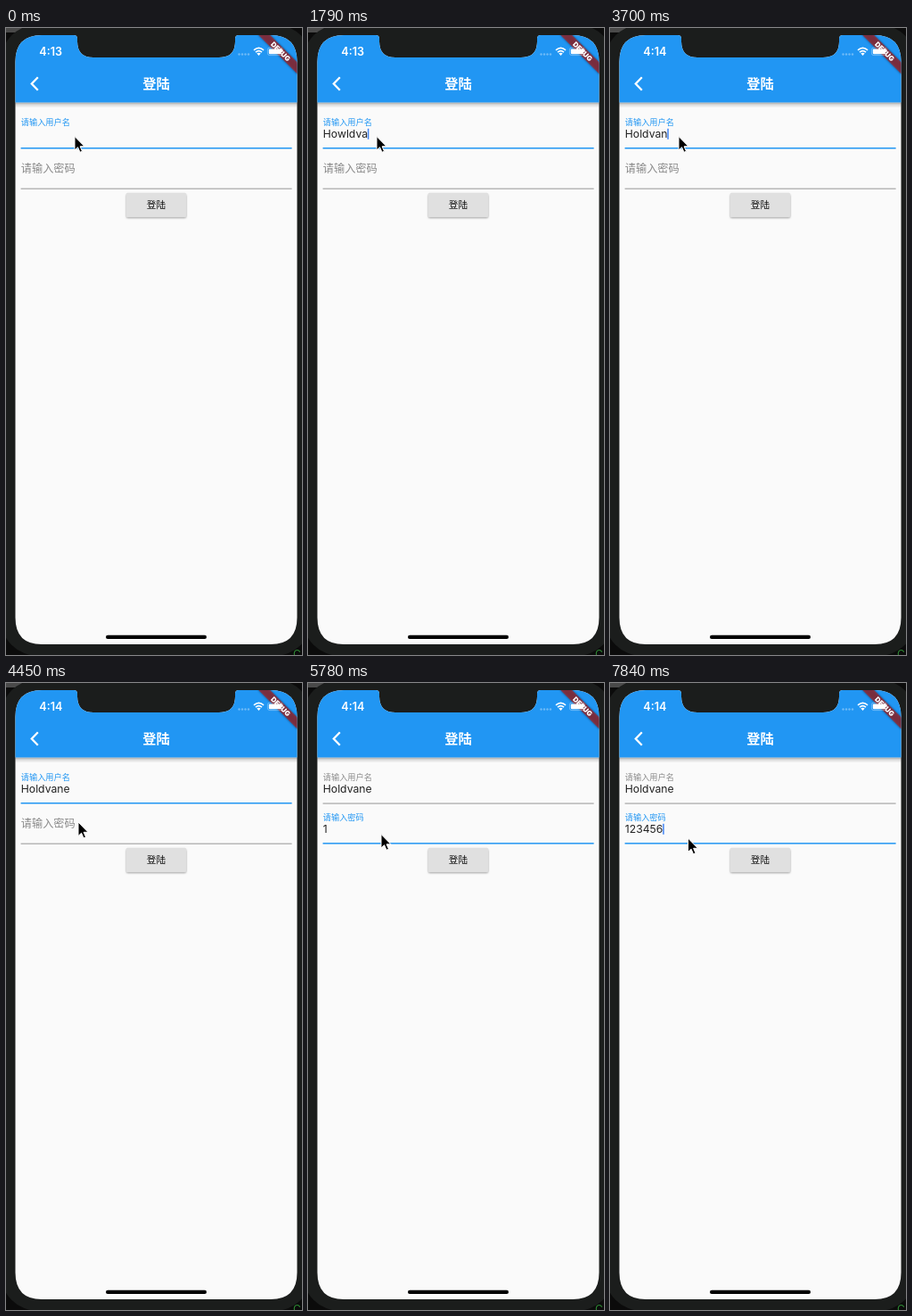
An HTML page for the animation above (7.99 s loop, 332 px wide and 703 px high).

```html
<!DOCTYPE html>
<html lang="zh-CN">
<head>
<meta charset="utf-8">
<title>登陆</title>
<style>
html, body { margin: 0; width: 100%; height: 100%; overflow: hidden; background: #0b0b0b; }
svg { display: block; width: 332px; height: 703px; }
text { font-family: Inter, "Noto Sans CJK SC", "Noto Sans CJK", sans-serif; }
.mid { text-anchor: middle; }
.entry { font-size: 12.2px; fill: #222; }
</style>
</head>
<body>
<svg viewBox="0 0 332 703">
  <defs>
    <clipPath id="screen">
      <path d="M40 8H76Q80 8 80 12V15Q80 33 98 33H239Q257 33 257 15V12Q257 8 261 8H297Q326.5 8 326.5 38V661Q326.5 691 297 691H40Q10.500 691 10.500 661V38Q10.500 8 40 8Z"/>
    </clipPath>
    <linearGradient id="shade" x2="0" y2="1">
      <stop offset="0" stop-opacity=".34"/>
      <stop offset=".4" stop-opacity=".13"/>
      <stop offset="1" stop-opacity="0"/>
    </linearGradient>
    <filter id="soft" x="-20%" y="-50%" width="140%" height="200%"><feGaussianBlur stdDeviation="1"/></filter>
  </defs>

  <rect width="332" height="703" fill="#0b0b0b"/>
  <rect width="30" height="5" fill="#4a4a4a"/>
  <rect x="-6" y="-4" width="349" height="708" rx="42" fill="#1b1d1c"/>
  <text x="322" y="706" font-size="12" fill="#2f8a35">C</text>

  <g clip-path="url(#screen)">
    <rect x="10" y="8" width="317" height="683" fill="#fafafa"/>
    <rect x="10" y="83.500" width="317" height="6" fill="url(#shade)"/>
    <rect x="10" y="8" width="317" height="75.500" fill="#2196f3"/>
    <g transform="translate(326.500 8) rotate(45)">
      <rect x="-31" y="21.400" width="62" height="9.200" fill="#000" opacity=".5" filter="url(#soft)"/>
      <rect x="-31" y="21.400" width="62" height="9.200" fill="#b71c1c" opacity=".63"/>
      <text class="mid" y="28.800" font-size="7.800" font-weight="900" fill="#fff">DEBUG</text>
    </g>
    <g fill="#fff">
      <text id="clock" x="37.300" y="31" font-size="12.600" font-weight="600"></text>
      <g opacity=".35">
        <circle cx="261.500" cy="29.500" r="1.200"/><circle cx="265" cy="29.500" r="1.200"/>
        <circle cx="268.500" cy="29.500" r="1.200"/><circle cx="272" cy="29.500" r="1.200"/>
      </g>
      <path d="M283.500 31L281.300 28.600Q283.500 26.900 285.700 28.600Z"/>
      <path d="M278 24.900Q283.500 19.900 289 24.900M280 27.200Q283.500 24 287 27.200" fill="none" stroke="#fff" stroke-width="1.700"/>
      <rect x="293.400" y="22" width="17" height="8.600" rx="2.400" fill="none" stroke="#fff" stroke-width=".8" opacity=".4"/>
      <rect x="294.800" y="23.400" width="14.200" height="5.900" rx="1.200"/>
      <text class="mid" x="168.500" y="68" font-size="15.200" font-weight="700">登陆</text>
    </g>
    <path d="M35.800 55.300L28.800 62.500L35.800 69.700" fill="none" stroke="#fff" stroke-width="2.300"/>

    <text id="userLabel" x="16.800" y="108.800" font-size="9.200">请输入用户名</text>
    <text id="user" class="entry" x="16.800" y="122.800"></text>
    <rect id="userLine" x="16.600" width="304"/>
    <text id="passLabel" x="16.800">请输入密码</text>
    <text id="pass" class="entry" x="16.800" y="167.800"></text>
    <rect id="passLine" x="16.600" width="304"/>
    <rect id="caret" width="1.500" height="12" fill="#4285f4"/>

    <rect x="135" y="186.500" width="67" height="26.500" rx="1.500" opacity=".4" filter="url(#soft)"/>
    <rect x="134.800" y="184.800" width="67.300" height="27.400" rx="1.500" fill="#e0e0e0"/>
    <text class="mid" x="168.500" y="202.200" font-size="10.700" font-weight="500" fill="#111">登陆</text>
    <circle id="touch" cx="83.500" cy="169.500" r="15" opacity=".09"/>
    <rect x="112" y="680.800" width="113" height="4.200" rx="2.100"/>
  </g>
  <path id="mouse" d="M0 0V15.500L3.600 12.200L6 17.800L8.500 16.700L6.100 11.300H11Z" stroke="#fff" stroke-width="1" stroke-linejoin="round"/>
</svg>
<script>
const LOOP = 7990;
const BLUE = [33, 150, 243], GRAY = [138, 138, 138];
const el = Object.fromEntries([...document.querySelectorAll('svg [id]')].map(e => [e.id, e]));

// Each track holds [start ms, value...]; values change hard.
const tracks = {
  clock: [[0, '4:13'], [2080, '4:14']],
  user: [
    [0, ''], [900, 'H'], [1050, 'Ho'], [1200, 'How'], [1340, 'Howld'], [1490, 'Howldvan'],
    [1790, 'Howldva'], [1930, 'Howldv'], [2080, 'Howld'], [2230, 'How'], [2370, 'Ho'],
    [2670, 'Hol'], [2810, 'Hold'], [3410, 'Holdv'], [3560, 'Holdva'], [3700, 'Holdvan'], [3850, 'Holdvane']
  ],
  pass: [[0, ''], [5780, '1'], [5930, '12'], [6220, '123'], [6510, '1234'], [6810, '12345'], [7100, '123456']],
  caret: [
    [0, 0], [600, 1], [900, 0], [1200, 1], [2080, 0], [2370, 1], [2810, 0], [3560, 1], [3850, 0],
    [4890, 1], [5490, 0], [6070, 1], [6360, 0], [6950, 1], [7400, 0], [7840, 1]
  ],
  mouse: [
    [0, 77, 121.5], [4300, 78, 131], [4450, 81, 156], [4600, 82, 179], [4740, 82, 169.5],
    [7250, 85, 172], [7400, 87.5, 174]
  ],
  touch: [[0, 0], [4740, 1], [5040, 0]],
  focus: [[0, 0], [4890, 0.07], [5040, 0.85], [5190, 1]]
};

const at = (name, t) => tracks[name].findLast(step => step[0] <= t).slice(1);
const mix = (a, b, k) => a + (b - a) * k;
const tint = k => `rgb(${GRAY.map((g, i) => Math.round(mix(g, BLUE[i], k)))})`;

function set(node, attrs) {
  for (const key in attrs) node.setAttribute(key, attrs[key]);
}

function underline(node, bottom, k) {
  const h = k > 0.5 ? 1.5 : 0.9;
  set(node, { y: bottom - h, height: h, fill: tint(k) });
}

function draw(t) {
  for (const name of ['clock', 'user', 'pass']) {
    const [value] = at(name, t);
    if (el[name].textContent !== value) el[name].textContent = value;
  }

  const [shift] = at('focus', t);
  const active = shift > 0.5 ? shift : 0;
  set(el.userLabel, { fill: tint(1 - active) });
  underline(el.userLine, 135.5, 1 - active);
  set(el.passLabel, { fill: tint(active), 'font-size': mix(12.2, 9.2, shift), y: mix(162, 153.8, shift) });
  underline(el.passLine, 180.6, active);

  const field = shift ? el.pass : el.user;
  const width = field.textContent ? field.getComputedTextLength() : 0;
  set(el.caret, { x: 16.6 + width, y: shift ? 157.8 : 112.8, visibility: at('caret', t)[0] ? 'visible' : 'hidden' });
  set(el.touch, { visibility: at('touch', t)[0] ? 'visible' : 'hidden' });
  set(el.mouse, { transform: `translate(${at('mouse', t)})` });
}

const start = performance.now();
function tick() {
  draw((performance.now() - start) % LOOP);
  requestAnimationFrame(tick);
}
tick();
</script>
</body>
</html>
```
